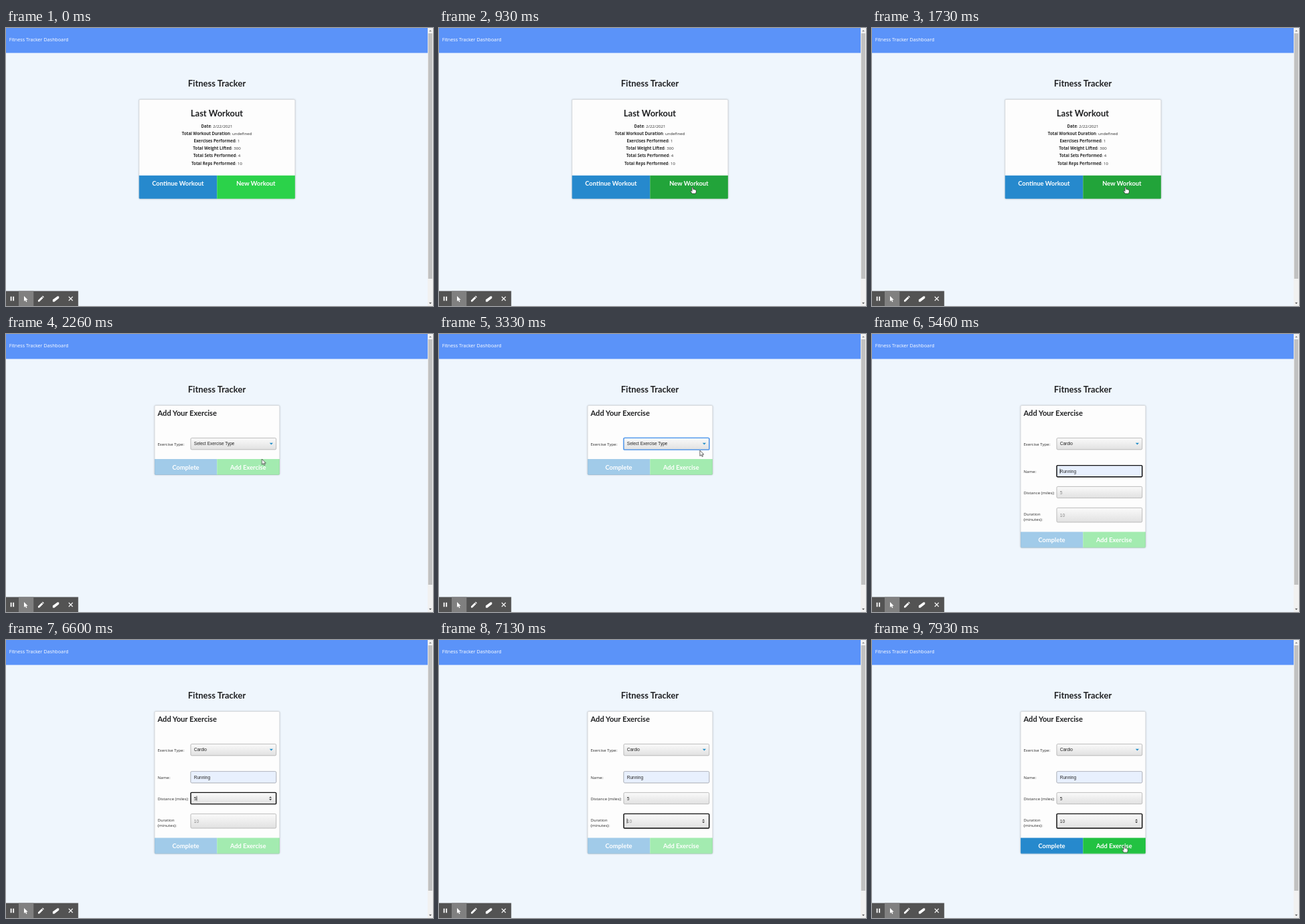
An HTML page for the animation above (8 s loop, 640 px wide and 418 px high).

```html
<!DOCTYPE html>
<html lang="en">
<head>
<meta charset="utf-8">
<title>Fitness Tracker</title>
<style>
html, body { margin: 0; height: 100%; overflow: hidden; background: #eff6fd; }
svg { display: block; width: 100%; height: 100%; }

text { font: 6.15px "Open Sans", sans-serif; fill: #2b2b2b; }
.nav { font-size: 7.22px; fill: #fff; }
.h1, .h2, .btn { font-family: Lato, sans-serif; font-weight: 700; fill: #1e1f21; }
.h1 { font-size: 13px; }
.h2 { font-size: 11.15px; }
.btn { font-size: 9.4px; fill: #fff; }
.mid { text-anchor: middle; }
.b { font-weight: 700; }
.val { font: 6.5px "Liberation Sans", Arial, sans-serif; fill: #222; }
.hint { fill: #858585; }

.card { fill: #fdfdfd; stroke: #d3d6da; stroke-width: .8; filter: drop-shadow(0 .7px 1px #0003); }
.field { fill: url(#grey); stroke: #adadad; stroke-width: .8; }
.auto { fill: #e8f0fe; stroke: #adb2bc; stroke-width: .8; }
.ring { fill: none; stroke: #111; stroke-width: 1.4; }
.blue { fill: #2689cd; }
.green { fill: #2bd24a; }

/* Every part shares one 8 s clock; 1% is 80 ms. */
.k { animation: 8s step-end infinite; }
.home { animation-name: home; }
.form { animation-name: form; }
.cardPage { animation-name: grow; }
.bar { animation-name: drop; }
.unset { animation-name: unset-type; }
.cardio { animation-name: cardio; }
.pick { animation-name: pick; }
.nameRing { animation-name: name-ring; }
.nameHint { animation-name: name-hint; }
.nameVal { animation-name: name-val; }
.distRing { animation-name: dist-ring; }
.distVal { animation-name: dist-val; }
.durRing { animation-name: dur-ring; }
.durHint { animation-name: dur-hint; }
.durOne { animation-name: dur-one; }
.durTen { animation-name: dur-ten; }
.caret { animation-name: caret; }
.newBtn { animation-name: hover-new; }
.fade { animation: enable 8s linear infinite; }
.addBtn { animation-name: hover-add; }
.cursor { animation: move 8s linear infinite; }
.arrow { animation-name: arrow; }
.hand { animation-name: hand; }

@keyframes home { 24.1%, to { visibility: hidden } }
@keyframes form { 0% { visibility: hidden } 24.1%, to { visibility: inherit } }
@keyframes grow { 0% { height: 104px } 46.63%, to { height: 213.5px } }
@keyframes drop { 0% { transform: translateY(188px) } 46.63%, to { transform: translateY(297.5px) } }
@keyframes unset-type { 46.63%, to { visibility: hidden } }
@keyframes cardio { 0% { visibility: hidden } 46.63%, to { visibility: inherit } }
@keyframes pick { 0%, 55%, to { visibility: hidden } 32.5% { visibility: inherit } }
@keyframes name-ring { 0%, 75%, to { visibility: hidden } 55% { visibility: inherit } }
@keyframes name-hint { 65%, to { visibility: hidden } }
@keyframes name-val { 0% { visibility: hidden } 65%, to { visibility: inherit } }
@keyframes dist-ring { 0%, 86%, to { visibility: hidden } 75% { visibility: inherit } }
@keyframes dist-val { 0% { fill: #858585 } 80%, to { fill: #222 } }
@keyframes dur-ring { 0% { visibility: hidden } 86%, to { visibility: inherit } }
@keyframes dur-hint { 90%, to { visibility: hidden } }
@keyframes dur-one { 0%, 91.6%, to { visibility: hidden } 90% { visibility: inherit } }
@keyframes dur-ten { 0% { visibility: hidden } 91.6%, to { visibility: inherit } }
@keyframes caret {
  0% { opacity: 0 }
  55% { opacity: 1; transform: translate(281.9px, 206.2px) }
  61.25% { opacity: 0; transform: translate(281.9px, 206.2px) }
  67.5% { opacity: 1; transform: translate(281.9px, 206.2px) }
  71.25% { opacity: 1; transform: translate(306.4px, 206.2px) }
  75% { opacity: 1; transform: translate(281.9px, 238.2px) }
  80% { opacity: 1; transform: translate(285.8px, 238.2px) }
  86% { opacity: 1; transform: translate(281.9px, 272.1px) }
  90% { opacity: 1; transform: translate(285.8px, 272.1px) }
  91.6% { opacity: 1; transform: translate(289.5px, 272.1px) }
  97.8%, to { opacity: 0 }
}
@keyframes hover-new { 7.5%, to { fill: #22a43a } }
@keyframes enable { 0%, 90% { opacity: .43 } 91.2%, to { opacity: 1 } }
@keyframes hover-add { 95%, to { fill: #22c242 } }
@keyframes move {
  0%, 4.1% { transform: translate(487px, 247px) }
  7.5% { transform: translate(433px, 243px) }
  10.8%, 25% { transform: translate(380px, 239px) }
  27.5%, 29.1% { transform: translate(383.5px, 188px) }
  31.8%, 40.6% { transform: translate(391px, 166px) }
  43.5% { transform: translate(391px, 191px) }
  43.6%, 95% { transform: translate(385px, 302px) }
  97.5%, to { transform: translate(378px, 309.5px) }
}
@keyframes arrow {
  0%, 7.5%, 44.1%, to { visibility: hidden }
  4.1%, 25% { visibility: visible }
  43.5% { visibility: hidden }
}
@keyframes hand {
  0%, 25% { visibility: hidden }
  7.5%, 95%, to { visibility: visible }
}
</style>
</head>
<body>
<svg viewBox="0 0 640 418">
  <defs>
    <linearGradient id="grey" x2="0" y2="1">
      <stop stop-color="#fafafa"/>
      <stop offset="1" stop-color="#e1e1e1"/>
    </linearGradient>
    <path id="pointer" d="M0 0V8.4L2 6.6 3.3 9.5 4.7 8.9 3.4 6.1H6Z"/>
    <path id="spin" d="M-2 -.8L0 -3 2 -.8ZM-2 .8L0 3 2 .8Z" fill="#444"/>
  </defs>

  <rect width="640" height="418" fill="#eff6fd"/>
  <rect width="632" height="37.5" fill="#5b93f9"/>
  <text class="nav" x="4.7" y="19.5">Fitness Tracker Dashboard</text>
  <text class="h1 mid" x="316" y="88">Fitness Tracker</text>

  <g class="k home">
    <rect class="card" x="199.4" y="107.5" width="233.8" height="149.3" rx="1.5"/>
    <text class="h1 mid" x="316" y="132.5">Last Workout</text>
    <g class="mid">
      <text x="316" y="149.6"><tspan class="b">Date</tspan>: 2/22/2021</text>
      <text x="316" y="160.8"><tspan class="b">Total Workout Duration</tspan>: undefined</text>
      <text x="316" y="172"><tspan class="b">Exercises Performed</tspan>: 1</text>
      <text x="316" y="183.2"><tspan class="b">Total Weight Lifted</tspan>: 300</text>
      <text x="316" y="194.4"><tspan class="b">Total Sets Performed</tspan>: 4</text>
      <text x="316" y="205.6"><tspan class="b">Total Reps Performed</tspan>: 10</text>
    </g>
    <path class="blue" d="M199.4 221.7H316.3V256.8H200.9Q199.4 256.8 199.4 255.3Z"/>
    <path class="green k newBtn" d="M316.3 221.7H433.2V255.3Q433.2 256.8 431.7 256.8H316.3Z"/>
    <text class="btn mid" x="257.8" y="237.3">Continue Workout</text>
    <text class="btn mid" x="374.5" y="237.3">New Workout</text>
  </g>

  <g class="k form">
    <rect class="card k cardPage" x="222.8" y="107.5" width="187.2" height="104" rx="1.5"/>
    <text class="h2" x="227.2" y="123.1">Add Your Exercise</text>

    <text x="227.2" y="168.1">Exercise Type:</text>
    <rect class="field" x="276.9" y="156.4" width="128" height="17.4" rx="1.6"/>
    <rect class="ring k pick" x="276.7" y="156.2" width="128.4" height="17.8" rx="1.8" style="stroke:#5b9ff0;stroke-width:1.6"/>
    <path d="M395 163.8H400.2L397.6 166.5Z" fill="#1e8cc8"/>
    <text class="val k unset" x="281.8" y="167.4">Select Exercise Type</text>

    <g class="k cardio">
      <text class="val" x="281.8" y="167.4">Cardio</text>

      <text x="227.2" y="209.1">Name:</text>
      <rect class="field" x="276.9" y="197.6" width="128" height="17.2" rx="1.6"/>
      <text class="val hint k nameHint" x="281.8" y="208.5">Running</text>
      <g class="k nameVal">
        <rect class="auto" x="276.9" y="197.6" width="128" height="17.2" rx="1.6"/>
        <text class="val" x="281.8" y="208.5">Running</text>
      </g>
      <rect class="ring k nameRing" x="276.9" y="197.6" width="128" height="17.2" rx="1.2"/>

      <text x="227.2" y="241.1">Distance (miles):</text>
      <rect class="field" x="276.9" y="229.4" width="128" height="17.2" rx="1.6"/>
      <text class="val k distVal" x="281.8" y="240.5">5</text>
      <g class="k distRing">
        <rect class="ring" x="276.9" y="229.4" width="128" height="17.2" rx="1.2"/>
        <use href="#spin" x="396.3" y="238.2"/>
      </g>

      <text x="227.2" y="272.6">Duration</text>
      <text x="227.2" y="281.4">(minutes):</text>
      <rect class="field" x="276.9" y="261.4" width="128" height="21.6" rx="1.6"/>
      <text class="val hint k durHint" x="281.8" y="274.5">10</text>
      <text class="val k durOne" x="281.8" y="274.5">1</text>
      <text class="val k durTen" x="281.8" y="274.5">10</text>
      <g class="k durRing">
        <rect class="ring" x="276.9" y="261.4" width="128" height="21.6" rx="1.2"/>
        <use href="#spin" x="396.3" y="272.2"/>
      </g>
      <path class="k caret" d="M0 -3.5V3.5" stroke="#111" stroke-width=".8"/>
    </g>

    <g class="k bar">
      <g class="fade">
        <path class="blue" d="M222.8 0H316.3V23.7H224.3Q222.8 23.7 222.8 22.2Z"/>
        <path class="green k addBtn" d="M316.3 0H410V22.2Q410 23.7 408.5 23.7H316.3Z"/>
      </g>
      <text class="btn mid" x="269.4" y="15.5">Complete</text>
      <text class="btn mid" x="362.8" y="15.5">Add Exercise</text>
    </g>
  </g>

  <!-- scrollbar -->
  <rect x="632" width="8" height="418" fill="#f1f1f1"/>
  <rect x="632.8" y="8" width="6.2" height="369" fill="#c1c1c1"/>
  <path d="M634 5.2L636 3 638 5.2Z" fill="#8a8a8a"/>
  <path d="M634 412.8L636 415 638 412.8Z" fill="#505050"/>

  <!-- recorder toolbar -->
  <rect y="395.5" width="108.3" height="22.5" fill="#535353"/>
  <rect x="19" y="395.5" width="22.3" height="22.5" fill="#808080"/>
  <g fill="#fff">
    <path d="M6.7 403.8H8.5V410.2H6.7ZM10.3 403.8H12.1V410.2H10.3Z"/>
    <use href="#pointer" transform="translate(27 403) scale(.95)"/>
    <path d="M48 411.6V409.5L53.5 404 55.6 406.1 50.1 411.6ZM54.1 403.4L55 402.6 57 404.6 56.2 405.5Z"/>
    <path d="M70 408.4L77.2 403.2 79.4 403.4V406.2L72.4 411.8 70 411.4Z"/>
    <path d="M94 404L100 410M100 404L94 410" stroke="#fff" stroke-width="1.1"/>
  </g>

  <g class="cursor" stroke="#222" stroke-width=".7" stroke-linejoin="round" fill="#fff">
    <use class="k arrow" href="#pointer"/>
    <path class="k hand" d="M-.9 .8Q0 -.7 .9 .8V3.6Q1.9 2.9 2.6 3.9 3.5 3.4 4.2 4.4 5.2 4 5.5 5.2V7.4L4.6 10H-.6L-3 6.6Q-3.1 5.2 -1.9 5.6L-.9 6.6Z"/>
  </g>
</svg>
</body>
</html>
```
